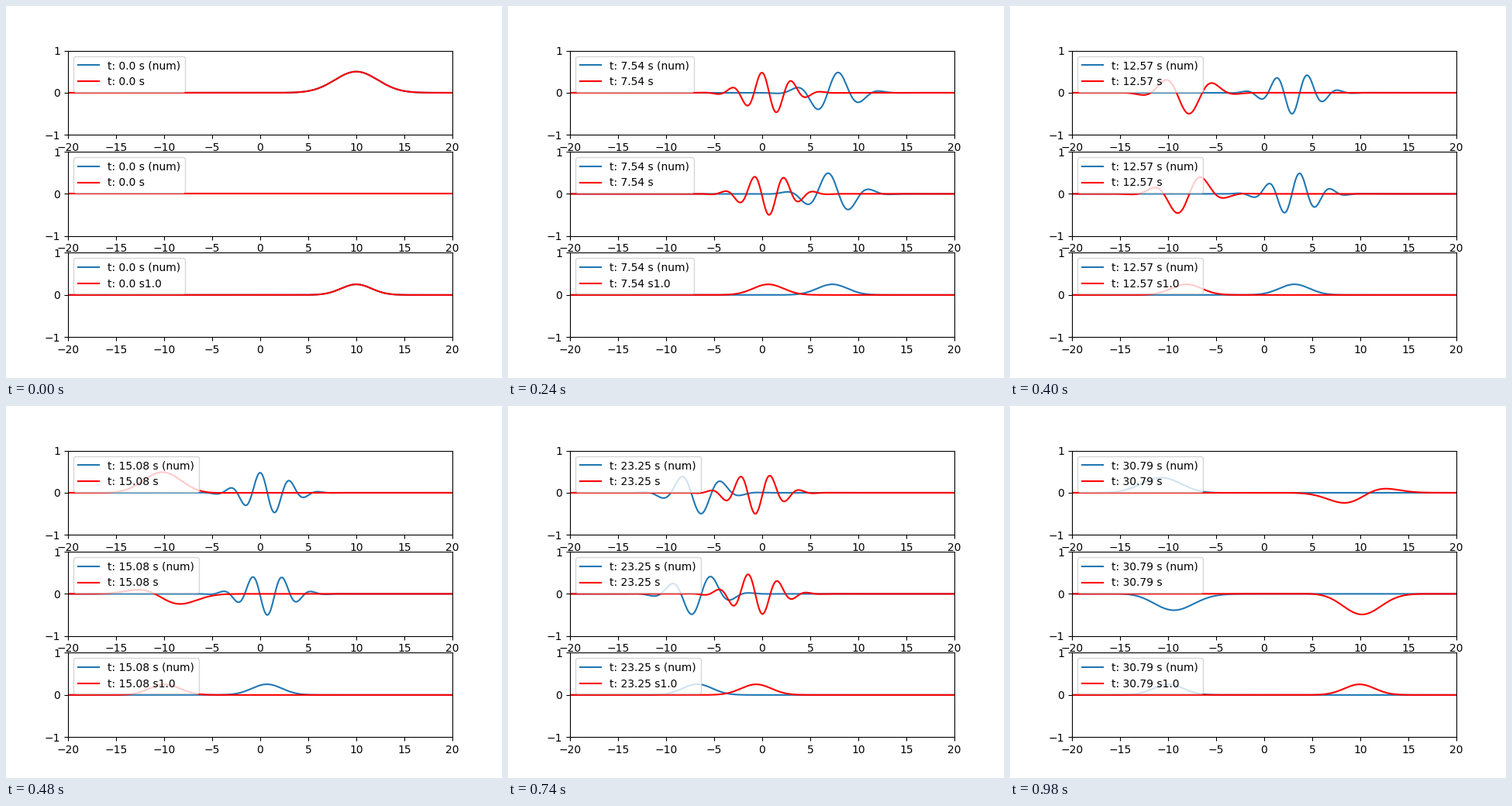
A matplotlib script for the animation above (1 s loop, 640 by 480 pixels).

```python
import numpy as np
import matplotlib.pyplot as plt
from matplotlib.animation import FuncAnimation

FRAMES = 50
INTERVAL = 20
OMEGA = 0.2
X0 = 10.0
STEP = np.pi / 5
NUM_RATE = 0.5  # the numerical solution advances at half speed

plt.rcParams["font.family"] = "DejaVu Sans"

x = np.linspace(-20, 20, 300)
dx = x[1] - x[0]


def exact_state(t):
    """Coherent state of the harmonic oscillator, released at X0."""
    wt = OMEGA * t
    envelope = (OMEGA / np.pi) ** 0.25 * np.exp(
        -OMEGA / 2 * (x - X0 * np.cos(wt)) ** 2)
    phase = (wt / 2 + OMEGA * X0 * x * np.sin(wt)
             - OMEGA * X0 ** 2 / 4 * np.sin(2 * wt))
    return envelope * np.exp(-1j * phase)


# Finite-difference Hamiltonian, diagonalised once
hop = np.full(x.size - 1, -0.5 / dx ** 2)
hamiltonian = (np.diag(1 / dx ** 2 + 0.5 * (OMEGA * x) ** 2)
               + np.diag(hop, 1) + np.diag(hop, -1))
energies, modes = np.linalg.eigh(hamiltonian)
weights = modes.T @ exact_state(0).real


def numeric_state(t):
    return modes @ (weights * np.exp(-1j * energies * t))


def components(psi):
    return psi.real, psi.imag, np.abs(psi) ** 2


fig, axes = plt.subplots(3, 1, figsize=(6.4, 4.8), dpi=100)
panels = []
for ax in axes:
    numeric_line, = ax.plot(x, 0 * x, color="C0", label="num")
    exact_line, = ax.plot(x, 0 * x, color="red", label="exact")
    ax.set_xlim(-20, 20)
    ax.set_ylim(-1, 1)
    ax.set_yticks([-1, 0, 1])
    legend = ax.legend(loc="upper left")
    panels.append((numeric_line, exact_line, legend.get_texts()))


def update(frame):
    t = frame * STEP
    exact = exact_state(t)
    norm = round(float(np.sum(np.abs(exact) ** 2) * dx), 2)
    curves = zip(components(numeric_state(NUM_RATE * t)), components(exact))
    label = f"t: {round(t, 2)} s"
    suffixes = ("", "", str(norm))
    for panel, (num_y, exact_y), suffix in zip(panels, curves, suffixes):
        numeric_line, exact_line, texts = panel
        numeric_line.set_ydata(num_y)
        exact_line.set_ydata(exact_y)
        texts[0].set_text(label + " (num)")
        texts[1].set_text(label + suffix)
    return []


anim = FuncAnimation(fig, update, frames=FRAMES, interval=INTERVAL, repeat=True)
plt.show()
```
